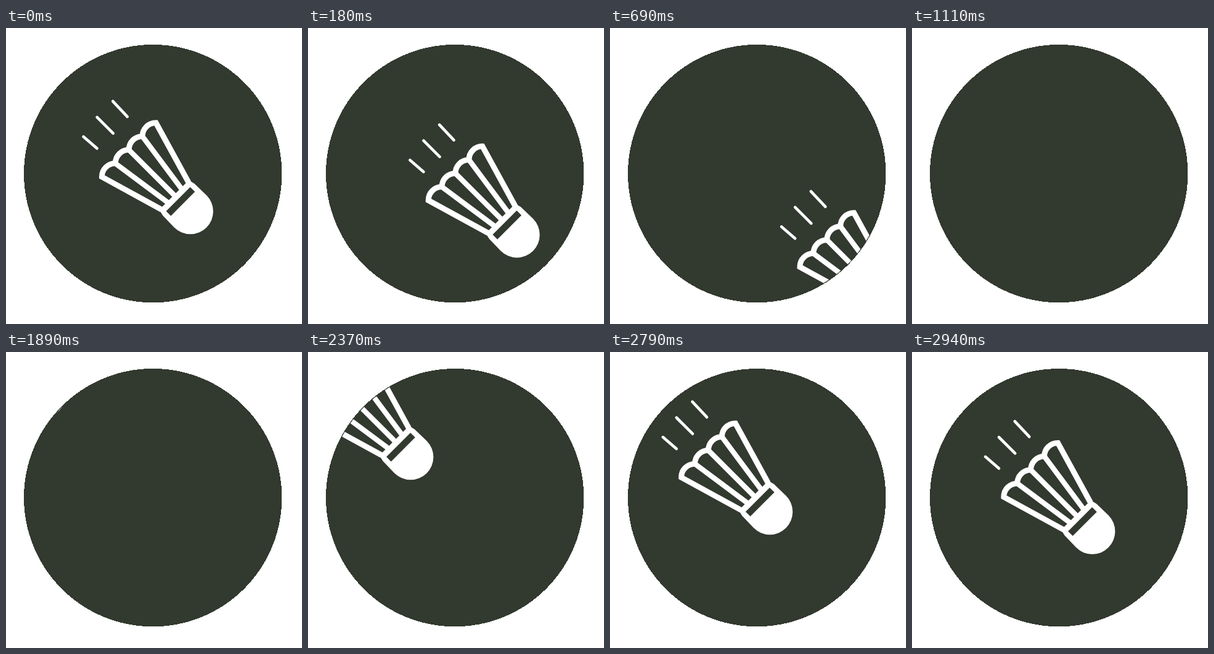
Recreate the animation shown at these times as an HTML page. Size 480 by 480 pixels, loop 2.97 s.

```html
<!DOCTYPE html>
<html lang="en">
<head>
<meta charset="utf-8">
<title>Shuttlecock</title>
<style>
  html, body { margin: 0; width: 100%; height: 100%; overflow: hidden; background: #fff; }
  svg { display: block; width: 100vw; height: 100vh; }
  .disc, .band { fill: #32392f; }
  .disc { shape-rendering: crispEdges; }
  .cork { fill: #fff; }
  .lines { fill: none; stroke: #fff; }
</style>
</head>
<body>
<svg viewBox="0 0 480 480">
  <defs>
    <clipPath id="rim"><circle cx="238.2" cy="236.1" r="208"/></clipPath>
  </defs>
  <circle class="disc" cx="238.2" cy="236.1" r="209.2"/>
  <g clip-path="url(#rim)">
    <g id="bird">
      <path class="lines" stroke-width="4.6" stroke-linecap="round"
        d="M173.3 118.8L196.8 143.8M147.6 144.6L173.8 170.8M125.6 176.2L147.6 195.2"/>
      <!-- x runs along the flight axis, origin at the centre of the cork -->
      <g transform="translate(299 297.3) rotate(45)">
        <path class="lines" id="feathers" stroke-width="9"/>
        <path class="lines" id="quills" stroke-width="8.4"/>
        <path class="cork" d="M-37.5 -34L-27 -36.4L0 -37A37 37 0 0 1 0 37L-27 36.4L-37.5 34Z"/>
        <rect class="band" x="-28" y="-27.6" width="10.8" height="55.2"/>
      </g>
    </g>
  </g>
</svg>
<script>
  const el = id => document.getElementById(id);
  const bird = el('bird');

  const TOP = -141, NECK = -35, GAP = 31;
  const arc = y => `A21.7 21.7 0 0 0 ${TOP} ${y}`;
  el('feathers').setAttribute('d',
    `M${NECK} -31L${TOP} ${-2 * GAP}` +
    [-1, 0, 1, 2].map(i => arc(i * GAP)).join('') +
    `L${NECK} 31`);
  el('quills').setAttribute('d',
    [-1, 0, 1].map(i => `M${NECK} ${i * 15.5}L${TOP} ${i * GAP}`).join(''));

  // Constant flight out to the lower right, a pause, then in from the upper left.
  const TICK = 30, TICKS = 99, LAST_OUT = 36, FIRST_IN = 63;
  const DX = 6.63, DY = 6.35;
  const start = performance.now();

  function draw(now) {
    const tick = Math.floor(Math.max(0, now - start) / TICK) % TICKS;
    const hidden = tick > LAST_OUT && tick < FIRST_IN;
    const step = tick < FIRST_IN ? tick : tick - TICKS;
    bird.setAttribute('visibility', hidden ? 'hidden' : 'visible');
    bird.setAttribute('transform', `translate(${step * DX} ${step * DY})`);
    requestAnimationFrame(draw);
  }
  draw(start);
</script>
</body>
</html>
```
